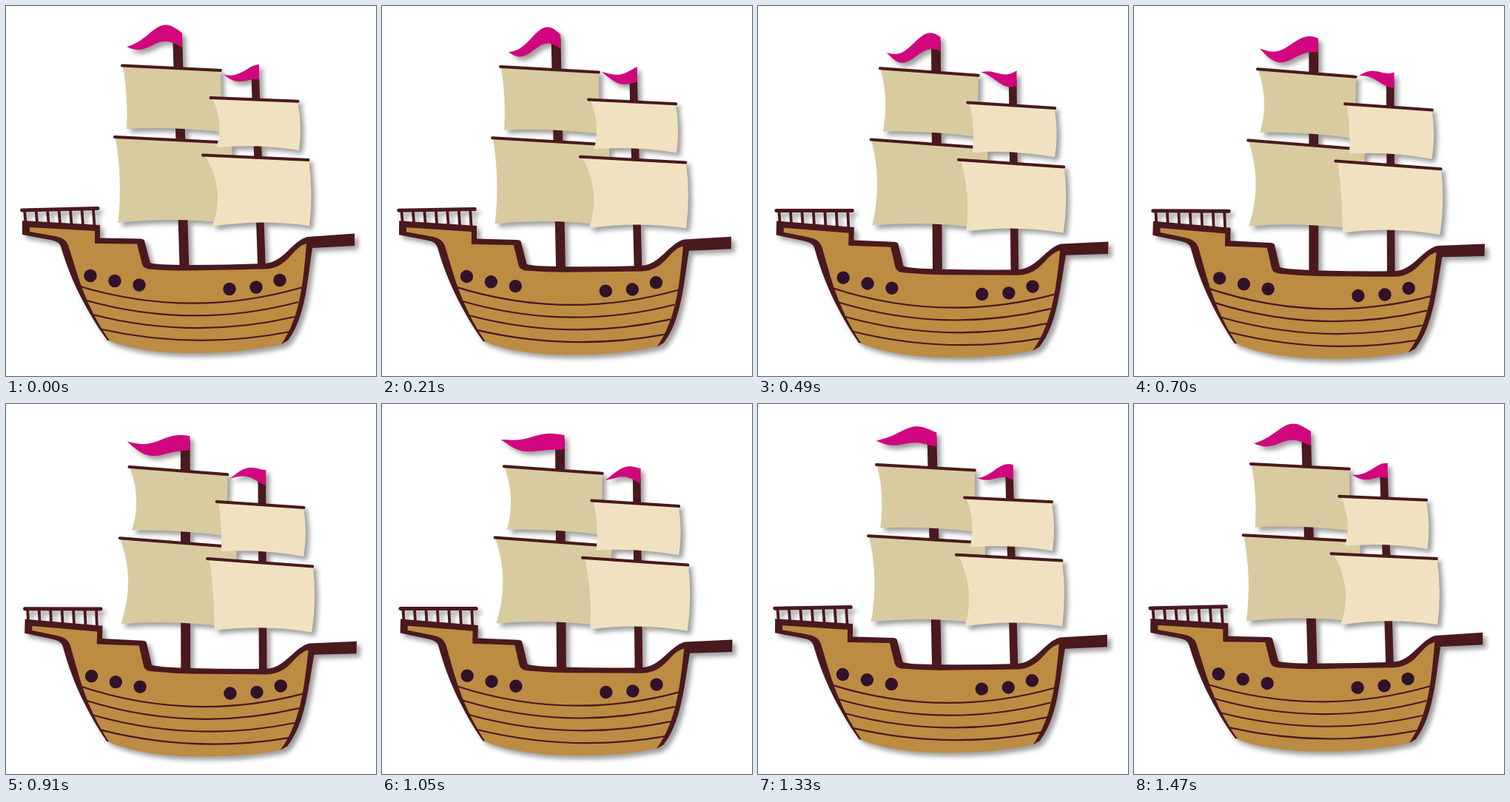
An HTML page for the animation above (1540 ms loop, 500 by 500 pixels).

```html
<!DOCTYPE html>
<html lang="en">
<head>
<meta charset="utf-8">
<title>Sailing ship</title>
<style>
html, body { margin: 0; width: 100%; height: 100%; overflow: hidden; background: #fff; }
svg { display: block; width: 100vw; height: 100vh; }
.line { fill: none; stroke: #4a191d; }
.wood { fill: #4a191d; }
.yard { stroke: #4a191d; stroke-width: 4; stroke-linecap: round; }
.rear { fill: #d8cb9f; }
.front { fill: #f0e2c1; }
.flag { fill: #d1067e; }
</style>
</head>
<body>
<svg viewBox="0 0 500 500">
  <defs>
    <filter id="shade" filterUnits="userSpaceOnUse" x="0" y="0" width="500" height="500" color-interpolation-filters="sRGB">
      <feDropShadow dx="5" dy="5" stdDeviation="3" flood-color="#000" flood-opacity=".38"/>
    </filter>
  </defs>
  <g filter="url(#shade)">
    <g id="ship">
      <path class="line" stroke-width="12.8" d="M231.700 42L241 354"/>
      <path class="line" stroke-width="10.6" d="M336.700 92L345.500 354"/>

      <path class="rear" id="rearLow"/>
      <path class="yard" d="M147 177L308 185"/>
      <path class="rear" id="rearTop"/>
      <path class="yard" d="M157 80.500L290 87"/>
      <path class="front" id="frontLow"/>
      <path class="yard" d="M266 201.500L408.500 208"/>
      <path class="front" id="frontTop"/>
      <path class="yard" d="M276.500 124L394.500 128.800"/>

      <path fill="#bc8c43" d="M25 296L124 300V317L183 319L190 349Q215 354 250 354T350 351C377 349 385 322 409 318L411 329C404 370 402 415 376 456Q325 469 250 469Q180 469 138 452C120 430 100 400 80 324Q74 318 64 315L25 306Z"/>
      <g id="planks" class="line" stroke-width="2.2"></g>
      <path class="wood" d="M22 290V309L60 316Q72 318 74 325C84 358 99 398 137 452L140 452C126 432 109 404 94 355L84 323Q80 313 66 311L32 305V299L120 304V321L177 321.500L184 349Q186 356 198 356Q225 358 250 357.500T350 355.500C383 354 386 326 406 321C402 370 398 420 372 457L381 452C405 420 407 372 414 327L471 324V307.500L407 312C386 318 375 347 349 348Q300 350 250 350T195 347L187 317Q186 314.500 181 314.500L127 313.500V296Z"/>
      <g id="rail" class="line"></g>
      <g id="ports" fill="#30132b"></g>
    </g>
    <path class="flag" id="bigFlag"/>
    <path class="flag" id="smallFlag"/>
  </g>
</svg>
<script>
const STEP = 70, COUNT = 22, TILT = 0.03, PIVOT_Y = 420;
const byId = id => document.getElementById(id);
const setPath = (id, d) => byId(id).setAttribute('d', d);

// One swing per loop, at its peak when n equals peak
const wave = (n, peak) => Math.cos(2 * Math.PI * (n - peak) / COUNT);

function rotate([x, y], angle) {
  const c = Math.cos(angle), s = Math.sin(angle), v = y - PIVOT_Y;
  return [x * c - v * s, PIVOT_Y + x * s + v * c];
}

const flags = {
  bigFlag: { at: [238, 46], width: 19, bulge: 42, length: 78, stretch: 8, peak: 4, amp: 9, drop: 5.5, curl: 5.5 },
  smallFlag: { at: [342, 89.5], width: 20.5, bulge: 8, length: 48, stretch: 0, peak: 18, amp: 8, drop: 0, curl: 0 }
};

// A ripple that runs from the free tip (s = 1) to the mast (s = 0)
function flagPath(f, n, angle) {
  const [x0, y0] = rotate(f.at, angle);
  const length = f.length - f.stretch * wave(n, f.peak);
  const top = [], bottom = [];
  for (let i = 0; i <= 24; i++) {
    const s = i / 24;
    const swing = f.amp * (1 - (1 - s) ** 3) * wave(n, f.peak + 10.8 * (1 - s));
    const y = y0 + f.drop * s - f.curl * Math.sin(2 * Math.PI * s) + swing;
    const half = (1 - s) * (f.width + f.bulge * s) / 2;
    const x = x0 - length * s;
    top.push([x, y - half]);
    bottom.unshift([x, y + half]);
  }
  return `M${top.concat(bottom).join('L')}Z`;
}

// Corners clockwise from top left; each edge bends at its middle
function sailPath([tl, tr, br, bl], left, right, rise) {
  const mid = (a, b, dx, dy) => [(a[0] + b[0]) / 2 + 2 * dx, (a[1] + b[1]) / 2 + 2 * dy];
  return `M${tl}L${tr}Q${mid(tr, br, right, 0)} ${br}Q${mid(br, bl, 0, -rise)} ${bl}Q${mid(bl, tl, left, 0)} ${tl}Z`;
}

const sails = {
  rearTop: [[158, 81], [290, 87], [289, 170], [163, 166]],
  rearLow: [[148, 178], [305, 185], [303, 294], [151.5, 293]],
  frontTop: [[279, 125], [394, 129], [396, 195], [284.5, 191]],
  frontLow: [[269, 202], [409, 208], [410, 297], [278.5, 298]]
};

function draw(n) {
  const u = 1 - Math.abs(n - 11) / 11;
  const sway = (0.5 - 0.5 * Math.cos(Math.PI * u) + Math.sin(Math.PI * u / 2)) / 2;
  const angle = TILT * sway;
  byId('ship').setAttribute('transform', `rotate(${angle * 180 / Math.PI} 0 ${PIVOT_Y})`);

  const rear = wave(n, 12.5), front = wave(n, 0.5);
  setPath('rearTop', sailPath(sails.rearTop, 4.8 + 2.6 * rear, 1, 2.5));
  setPath('rearLow', sailPath(sails.rearLow, 7 + 3.3 * rear, 1, 4.5));
  setPath('frontTop', sailPath(sails.frontTop, 4 + 2.5 * front, 2.8, 3.5));
  setPath('frontLow', sailPath(sails.frontLow, 6.5 + 5.5 * front, 3, 5));

  for (const id in flags) setPath(id, flagPath(flags[id], n, angle));
}

let planks = '';
for (let i = 0; i < 4; i++) {
  const x = 97 + 10 * i, y = 378 + 19.5 * i;
  const x2 = 401 - 5.5 * i, y2 = 380 + 20 * i;
  const bend = 2 * (401.7 + 16.7 * i) - (y + y2) / 2;
  planks += `<path d="M${x} ${y}Q${(x + x2) / 2} ${bend} ${x2} ${y2}"/>`;
}
byId('planks').innerHTML = planks;

let rail = '<path stroke-width="5" stroke-linecap="round" d="M21.500 276L124 273.500"/>';
for (let i = 0; i < 7; i++) {
  const x = 25 + 15.5 * i;
  rail += `<path stroke-width="3.8" d="M${x} 275L${x + 1.5} ${292 + i * 0.8}"/>`;
}
byId('rail').innerHTML = rail;

const ports = [[114, 364.5], [147, 371.5], [180, 377], [302, 382.5], [338, 380], [370, 370.5]];
byId('ports').innerHTML = ports.map(([x, y]) => `<circle cx="${x}" cy="${y}" r="8.7"/>`).join('');

const start = performance.now();
function tick() {
  draw(Math.floor((performance.now() - start) / STEP) % COUNT);
  requestAnimationFrame(tick);
}
tick();
</script>
</body>
</html>
```
